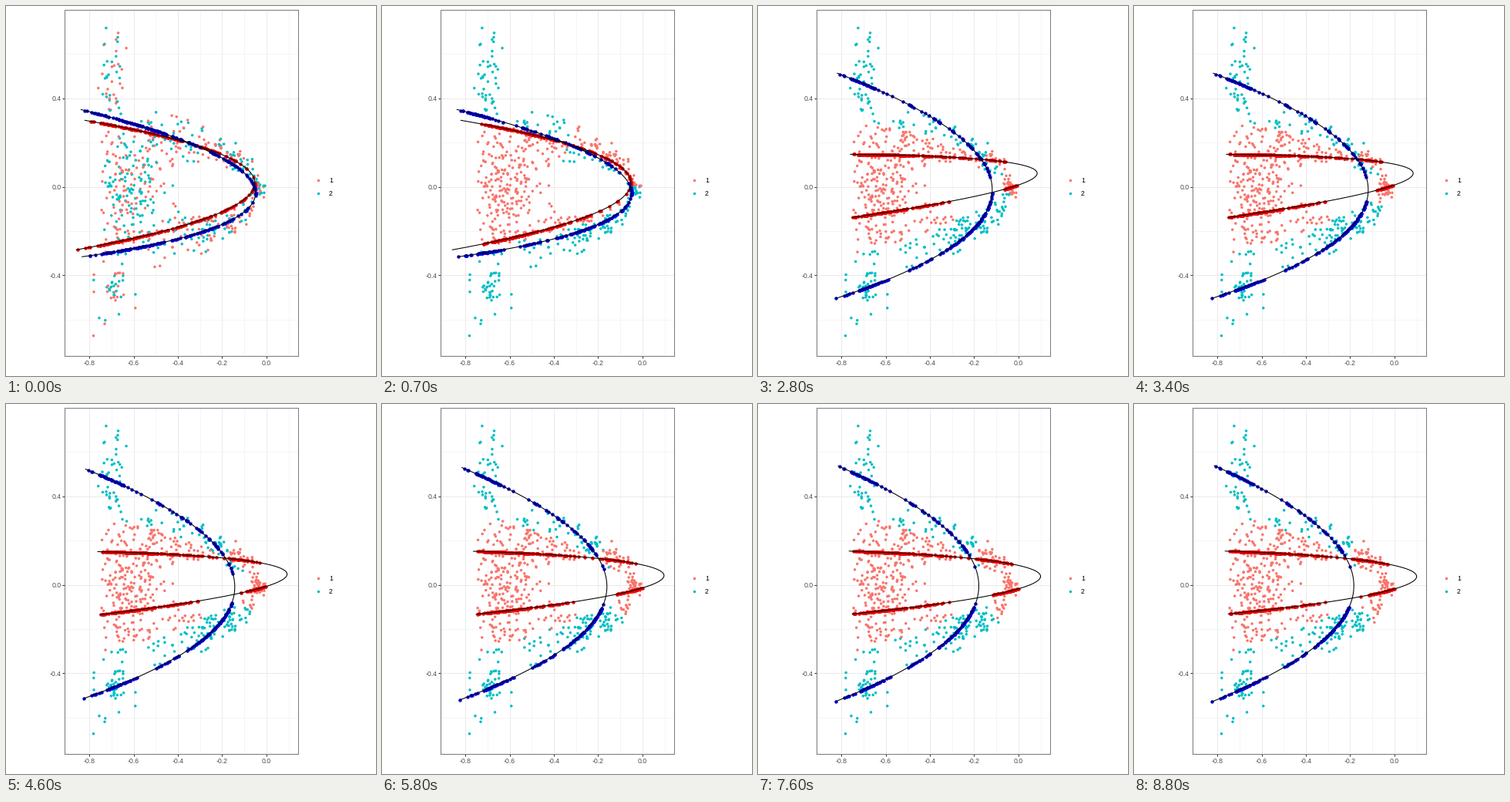
A matplotlib script for the animation above (10000 ms loop, 480x480 px).

```python
import numpy as np
import matplotlib.pyplot as plt
from matplotlib.animation import FuncAnimation

plt.rcParams["font.family"] = "Liberation Sans"
plt.rcParams["axes.unicode_minus"] = False

SIZE, DPI = 480, 72
INTERVAL, LOOP = 100, 10000
LEFT, RIGHT, TOP, BOTTOM = 76.2, 379.2, 5.2, 454.2
SCALE, X0, Y0 = 287.1, 337.8, 234.5
LIGHT = np.array(["#F8766D", "#00BFC4"])
DARK = ["#E80000", "#0000D8"]
ROUNDS = 8

# Steps alternate between reassigning and refitting: 700 ms, later 600 ms.
STARTS = np.cumsum([0] + [700] * 4 + [600] * 10)


# ---- data cloud, in stage pixels ----
def blob(rng, n, center, spread, low, high):
    """Normal cloud, kept inside a box."""
    p = rng.normal(center, spread, (n * 8, 2))
    inside = np.all((p > low) & (p < high), axis=1)
    return p[inside][:n]


def arc(rng, n, height, spread):
    """Points along a half ellipse side that closes at the right tip."""
    x = rng.uniform(183, 322, n)
    u = (x - 183) / 145
    y = 236 + height * np.sqrt(1 - u**2)
    return np.column_stack([x, y + rng.normal(0, spread, n).clip(-34, 34)
                            * (1 - 0.6 * u)])


def make_cloud(rng):
    return np.vstack([
        blob(rng, 46, (135, 98), (13, 36), (116, 25), (168, 142)),
        blob(rng, 38, (138, 378), (15, 36), (101, 318), (172, 435)),
        blob(rng, 12, (138, 366), (6, 7), (125, 340), (155, 385)),
        blob(rng, 225, (160, 226), (21, 46), (123, 149), (206, 312)),
        blob(rng, 14, (205, 250), (25, 30), (185, 205), (258, 290)),
        arc(rng, 128, -66, 19),
        arc(rng, 122, 70, 18),
        blob(rng, 36, (327, 237), (6, 9), (312, 216), (339, 254)),
    ])


# ---- cubic curves: start, two handles, end ----
# Random split, first refit and settled shape of each cluster.
RED = np.array([[(102, 148), (398, 199), (398, 260), (91, 316)],
                [(121, 193.5), (437, 190), (437, 216), (121, 276)],
                [(118, 190.5), (448.5, 201.5), (448.5, 240), (122, 272)]])
BLUE = np.array([[(97, 134), (398.7, 210), (398.7, 283), (98.5, 325)],
                 [(102, 90), (381.5, 190), (381.5, 293), (101, 376)],
                 [(104, 79), (343.5, 187.5), (343.5, 286), (101, 386.5)]])


def control(shapes, fit, rate):
    """Control points, which settle more and more from refit to refit."""
    split, first, final = shapes
    if fit == 0:
        return split
    return final + (first - final) * np.exp(-rate * (fit - 1) ** 1.2)


def bezier(ctrl, n=700):
    t = np.linspace(0, 1, n)[:, None]
    a, b, c, d = ctrl + 0.3
    u = 1 - t
    return u**3 * a + 3 * u * u * t * b + 3 * u * t * t * c + t**3 * d


def project(points, curve):
    """Distance to the curve and nearest position on it."""
    d = np.linalg.norm(points[:, None] - curve[None], axis=2)
    return d.min(axis=1), curve[d.argmin(axis=1)]


rng = np.random.default_rng(12)
cloud = rng.permutation(make_cloud(rng))
curves = [(bezier(control(RED, k, 0.62)), bezier(control(BLUE, k, 0.33)))
          for k in range(ROUNDS)]
feet = [[project(cloud, c) for c in pair] for pair in curves]
labels = [rng.integers(0, 2, len(cloud))]
labels += [(r[0] > b[0]).astype(int) for r, b in feet]


# ---- chart ----
fig = plt.figure(figsize=(SIZE / DPI, SIZE / DPI), dpi=DPI, facecolor="white")
ax = fig.add_axes([LEFT / SIZE, 1 - BOTTOM / SIZE,
                   (RIGHT - LEFT) / SIZE, (BOTTOM - TOP) / SIZE])
ax.set_xlim(LEFT, RIGHT)
ax.set_ylim(BOTTOM, TOP)
ax.set_axisbelow(True)


def px(v):
    return X0 + SCALE * v


def py(v):
    return Y0 - SCALE * v


x_ticks = np.linspace(-0.8, 0, 5)
y_ticks = np.linspace(-0.4, 0.4, 3)
ax.set_xticks(px(x_ticks), [f"{v:.1f}" for v in x_ticks])
ax.set_yticks(py(y_ticks), [f"{v:.1f}" for v in y_ticks])
ax.set_xticks(px(np.linspace(-0.7, 0.1, 5)), minor=True)
ax.set_yticks(py(np.linspace(-0.6, 0.6, 4)), minor=True)
ax.tick_params(which="minor", length=0)
ax.tick_params(which="major", length=2.75, width=1.07, pad=2.2,
               color="#333333", labelcolor="#4D4D4D", labelsize=8.8)
ax.grid(which="major", color="#EBEBEB", lw=1.07)
ax.grid(which="minor", color="#F3F3F3", lw=0.8)
for spine in ax.spines.values():
    spine.set(color="#7F7F7F", linewidth=1.07, zorder=6)

for i, y in enumerate((226, 243)):
    ax.scatter([405.3], [y], s=12.6, c=LIGHT[i], lw=0, clip_on=False)
    ax.text(419, y + 3.3, str(i + 1), size=8.8, color="black", va="baseline")

dots = ax.scatter(*cloud.T, s=12.6, lw=0, zorder=2)
marks = [ax.scatter([], [], s=20, c=c, lw=0, zorder=3) for c in DARK]
lines = [ax.plot([], [], color="black", lw=1.07, zorder=4)[0] for _ in DARK]


def draw(frame):
    state = np.searchsorted(STARTS, frame * INTERVAL, side="right") - 1
    fit, label = state // 2, labels[(state + 1) // 2]
    dots.set_facecolor(LIGHT[label])
    for k in range(2):
        marks[k].set_offsets(feet[fit][k][1][label == k])
        lines[k].set_data(*curves[fit][k].T)
    return [dots, *marks, *lines]


anim = FuncAnimation(fig, draw, frames=LOOP // INTERVAL, interval=INTERVAL,
                     repeat=True, repeat_delay=0, blit=False)
plt.show()
```
